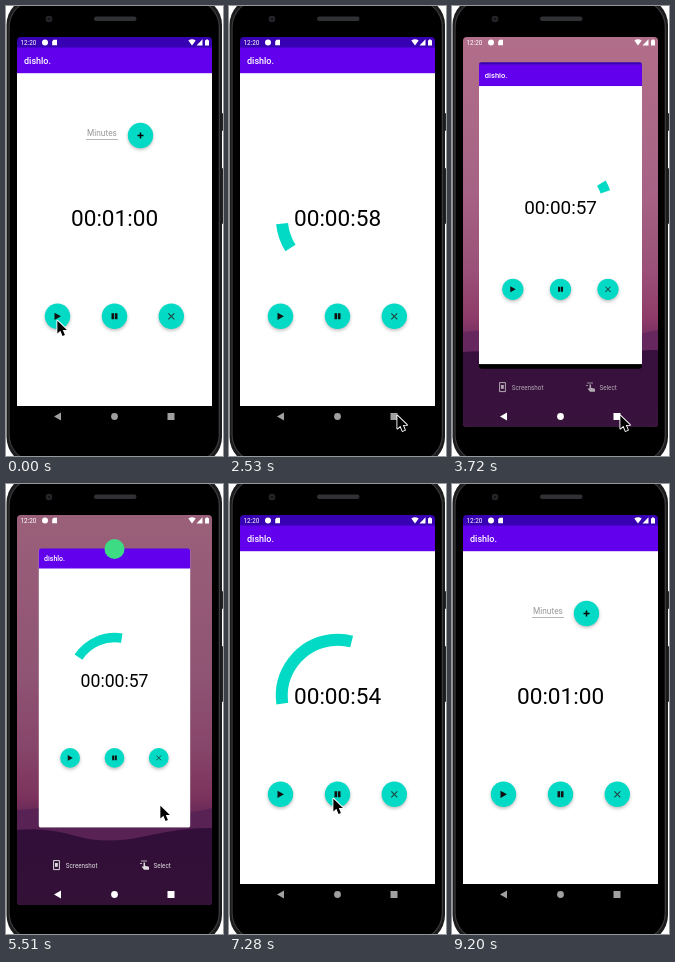
An HTML page with a canvas for the animation above (9520 ms loop, 217x450 px).

```html
<!DOCTYPE html>
<html lang="en">
<head>
<meta charset="utf-8">
<title>Kitchen timer</title>
<style>
html, body { margin: 0; width: 100%; height: 100%; overflow: hidden; background: #fff; }
canvas { display: block; width: 217px; height: 450px; }
</style>
</head>
<body>
<canvas id="stage"></canvas>
<script>
const LOOP = 9520, STEP = 148.4, TEAL = '#03dac5';
const STARTED = 1103, RESUMED = 5745;
const canvas = document.getElementById('stage');
const ctx = canvas.getContext('2d');
const ratio = window.devicePixelRatio || 1;
canvas.width = 217 * ratio;
canvas.height = 450 * ratio;

const clamp = (v, lo = 0, hi = 1) => Math.min(hi, Math.max(lo, v));

function rect(x, y, w, h, color) {
  ctx.fillStyle = color;
  ctx.fillRect(x, y, w, h);
}
function round(x, y, w, h, r, color) {
  ctx.beginPath();
  ctx.roundRect(x, y, w, h, r);
  ctx.fillStyle = color;
  ctx.fill();
}
function clipRound(x, y, w, h, r) {
  ctx.beginPath();
  ctx.roundRect(x, y, w, h, r);
  ctx.clip();
}
function disc(x, y, r, color) {
  ctx.beginPath();
  ctx.arc(x, y, r, 0, 2 * Math.PI);
  ctx.fillStyle = color;
  ctx.fill();
}
function shape(d, color) {
  ctx.fillStyle = color;
  ctx.fill(new Path2D(d));
}
function line(d, color, width) {
  ctx.strokeStyle = color;
  ctx.lineWidth = width;
  ctx.stroke(new Path2D(d));
}
function text(s, x, y, size, color, weight = 400) {
  ctx.font = `${weight} ${size}px Roboto, sans-serif`;
  ctx.fillStyle = color;
  ctx.fillText(s, x, y);
}

// Cubic curve (0,0) (.2,0) (.1,1) (.5,1), solved for y at x
function trimEase(x) {
  if (x <= 0) return 0;
  if (x >= 0.5) return 1;
  let lo = 0, hi = 1;
  for (let i = 0; i < 24; i++) {
    const t = (lo + hi) / 2, r = 1 - t;
    if (0.6 * r * r * t + 0.3 * r * t * t + 0.5 * t * t * t < x) lo = t; else hi = t;
  }
  return lo * lo * (3 - 2 * lo);
}

function spinner(elapsed) {
  const u = elapsed / 1333 % 1;
  const base = 90 * u + elapsed * 720 / 4444 - 90;
  const from = base + 270 * trimEase(u - 0.5);
  const to = base + 10.8 + 270 * trimEase(u);
  ctx.beginPath();
  ctx.arc(109, 212, 56.2, from * Math.PI / 180, to * Math.PI / 180);
  ctx.strokeStyle = TEAL;
  ctx.lineWidth = 12;
  ctx.stroke();
}

function fab(x, y, drawIcon) {
  ctx.save();
  ctx.shadowColor = 'rgba(0,0,0,.26)';
  ctx.shadowBlur = 3.5 * ratio;
  ctx.shadowOffsetY = 1.6 * ratio;
  disc(x, y, 12.7, TEAL);
  ctx.restore();
  ctx.save();
  ctx.translate(x, y);
  drawIcon();
  ctx.restore();
}

function app({ minutes, seconds, spin }) {
  rect(11, 31, 195, 11, '#3700b3');
  rect(11, 42, 195, 358, '#fff');
  rect(11, 400, 195, 21, '#000');
  rect(11, 41.5, 195, 25.7, '#6200ee');
  text('dishlo.', 18, 58, 9, '#fff', 500);
  if (minutes) {
    text('Minutes', 81, 130, 8.3, '#999');
    rect(80, 133, 32, 0.7, '#999');
    fab(134.5, 129.5, () => line('M-3 0H3M0-3V3', '#000', 1.5));
  }
  if (spin !== null) spinner(spin);
  text(seconds === 60 ? '00:01:00' : '00:00:' + seconds, 65, 219.7, 22.6, '#000');
  fab(51.5, 310.3, () => shape('M-3-3.6L3.4 0L-3 3.6Z', '#111'));
  fab(108.5, 310.3, () => shape('M-3-3h2.6v6h-2.6zM.4-3H3v6H.4z', '#111'));
  fab(165.3, 310.3, () => line('M-3-3L3 3M3-3L-3 3', '#1c4a46', 1.2));
}

function phoneBody() {
  rect(0, 0, 217, 450, '#fff');
  round(213, 107, 4, 18, 1, '#222');
  round(213, 162, 4, 56, 1, '#222');
  round(0.5, -9, 215.5, 468, 28, '#1c1c1e');
  round(2.5, -6, 211.5, 462, 27, '#3a3a3c');
  round(3.7, -5, 209, 460, 26, '#000');
  disc(43, 13, 3.3, '#24262a');
  disc(43, 13, 1.3, '#111317');
  round(88, 10.5, 42.5, 4.5, 2.2, '#303134');
}

function wallpaper(p) {
  const sky = ctx.createLinearGradient(0, 31, 0, 421);
  [[0, '#bd7691'], [0.4, '#b0688b'], [0.6, '#a4557e'], [0.72, '#973f6e'], [0.8, '#6c2862']]
    .forEach(([at, color]) => sky.addColorStop(at, color));
  rect(11, 31, 195, 390, sky);
  shape('M11 326Q60 320 110 328T206 324V421H11Z', '#6b2963');
  const hill = ctx.createLinearGradient(0, 345, 0, 421);
  hill.addColorStop(0, '#3a1140');
  hill.addColorStop(1, '#3c143f');
  shape('M11 346Q40 343 70 352T140 352T206 344V421H11Z', hill);
  rect(11, 31, 195, 390, `rgba(15,5,25,${0.2 * p ** 4})`);
}

function recentsActions(p) {
  ctx.globalAlpha = p;
  line('M47.6 376.6h5.8v9h-5.8z', '#ddd', 1);
  rect(49, 379, 2.8, 3.8, '#ddd');
  text('Screenshot', 59.8, 383.6, 6.3, '#ddd');
  shape('M137.5 378.5h1.5v3.2l4 1v3h-5l-2.5-3.2h2z', '#ddd');
  line('M135 377h6M136 379.5h-2', '#ddd', 0.8);
  text('Select', 147.5, 383.6, 6.3, '#ddd');
  ctx.globalAlpha = 1;
}

function statusBar() {
  text('12:20', 14.4, 39, 6.4, '#fff');
  disc(39, 36.5, 3, '#fff');
  shape('M47.5 33.8H51V39.3H46.2V35.2z', '#fff');
  shape('M182.3 34.5Q186 32 189.7 34.5L186 39.5z', '#fff');
  shape('M196.5 33.3V39.5H190.5z', '#fff');
  shape('M199 34.2h1v-.8h2v.8h1v5.3h-4z', '#fff');
}

function navBar(color) {
  shape('M48 410.5L55 406.4V414.6z', color);
  disc(108.5, 410.5, 3.4, color);
  rect(161.5, 407, 7, 7, color);
}

// [step, x, y] of the pointer tip
const pointerPath = [
  [0, 51, 314], [7, 51, 314], [8, 55, 316], [9, 74, 322], [10, 110, 336], [11, 155, 362],
  [12, 186, 386], [13, 183, 396], [14, 177, 400], [15, 171, 407], [16, 168, 409],
  [29, 168, 409], [37, 154, 321], [46, 154, 321], [47, 142, 320], [48, 112, 316],
  [49, 104, 314], [51, 104, 314], [54, 133, 313], [55, 152, 313], [56, 162, 312],
  [57, 162, 312], [58, 166, 325], [59, 174, 360], [60, 181, 402], [61, 184, 438], [64, 184, 460]
];
function pointer(step) {
  if (step >= 29 && step < 37 || step >= 62) return;
  const i = pointerPath.findIndex(key => key[0] > step);
  const [s0, x0, y0] = pointerPath[i - 1], [s1, x1, y1] = pointerPath[i];
  const f = (step - s0) / (s1 - s0);
  ctx.save();
  ctx.translate(x0 + (x1 - x0) * f, y0 + (y1 - y0) * f);
  ctx.scale(0.92, 0.92);
  ctx.lineJoin = 'round';
  const arrow = 'M.4.8V14.8L3.7 11.8L6 17.4L8.6 16.3L6.3 10.8H10.8Z';
  line(arrow, '#fff', 2);
  shape(arrow, '#000');
  ctx.restore();
}

function recentsAmount(step) {
  if (step < 23 || step > 40) return 0;
  if (step < 39) return 1 - (1 - clamp((step - 22) / 7)) ** 2.42;
  return (1 - (step - 38) / 3) ** 2;
}

function secondsLeft(step, time) {
  if (step < 7 || step >= 58) return 60;
  if (step < 40) return Math.max(57, 59 - Math.floor(Math.max(0, time - STARTED) / 1000));
  return step < 45 ? 55 : 54;
}

function spinTime(step, time) {
  if (step < 7 || step >= 51) return null;
  if (step < 27) return Math.max(0, time - STARTED);
  if (step < 39) return 2345;
  return Math.max(0, time - RESUMED);
}

function draw(now) {
  const step = Math.floor((now % LOOP + 5) / STEP);
  const time = step * STEP + 8;
  const p = recentsAmount(step), scale = 1 - 0.221 * p;
  ctx.setTransform(ratio, 0, 0, ratio, 0, 0);
  phoneBody();

  ctx.save();
  clipRound(11, 31, 195, 390, 4);
  if (p) {
    wallpaper(p);
    recentsActions(p);
  }
  ctx.translate(108.5, 212 - 14.7 * p);
  ctx.scale(scale, scale);
  ctx.translate(-108.5, -212);
  clipRound(11, 31 + 10.5 * p, 195, 390 - 31.5 * p, 4 * p);
  app({
    minutes: step < 7 || step >= 58,
    seconds: secondsLeft(step, time),
    spin: spinTime(step, time)
  });
  ctx.restore();

  if (p > 0.9) disc(108.5, 65, 10, '#3ddc84');
  statusBar();
  navBar(step >= 23 && step < 47 ? '#fff' : '#a0a0a0');
  pointer(step);
}

const start = performance.now();
function tick() {
  draw(performance.now() - start);
  requestAnimationFrame(tick);
}
tick();
</script>
</body>
</html>
```
